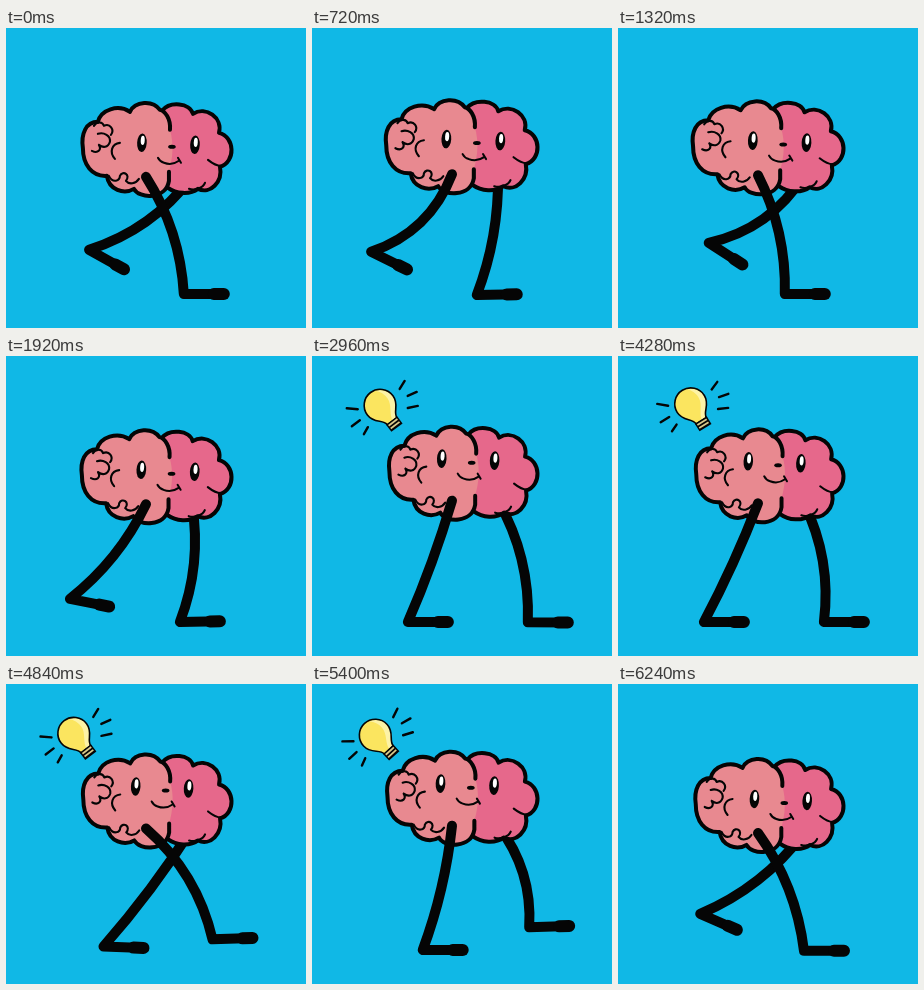
These frames come from a looping animation (300 px wide and 300 px high, 6.28 s). An HTML page with a canvas:

```html
<!DOCTYPE html>
<html lang="en">
<head>
<meta charset="utf-8">
<title>Walking brain</title>
<style>
html, body { margin: 0; width: 100%; height: 100%; overflow: hidden; background: #10b8e6; }
canvas { display: block; width: 100vw; height: 100vh; }
</style>
</head>
<body>
<canvas id="stage"></canvas>
<script>
const LOOP = 6280, STEPS = 5, SIZE = 300;
const INK = '#050505';
const canvas = document.getElementById('stage');
const ctx = canvas.getContext('2d');

// phase, heel x, heel y, foot angle in degrees, bend of the leg
const nearKeys = [
  [0, 178, 266, 0, 8], [.15, 146, 266, 0, 7], [.299, 111, 266, 0, 4],
  [.357, 96, 266, 0, 2], [.408, 86, 266, 0, 2], [.46, 75, 262, 3, 3],
  [.529, 64, 243, 11, 7], [.573, 59, 224, 26, 13], [.66, 78, 213, 32, 14],
  [.76, 142, 226, 18, 14], [.83, 198, 243, -2, 12], [.88, 207, 266, 0, 9]
];
const farKeys = [
  [0, 83, 222, 29, 10], [.08, 100, 214, 32, 13], [.18, 160, 226, 16, 14],
  [.25, 203, 238, 3, 12], [.299, 217, 243, -2, 10], [.34, 218, 264, 0, 9],
  [.408, 206, 266, 0, 9], [.529, 174, 266, -1, 8], [.573, 165, 267, -1, 6],
  [.7, 135, 266, 0, 5], [.87, 94, 261, 3, 3], [.93, 85, 242, 15, 7]
];

const leftLobe = 'M164 102C165 91 159 83 154 82C147 72 129 73 124 84' +
  'C112 76 95 82 92 94C80 94 75 106 77 120C77 137 86 149 101 148' +
  'C103 162 118 167 128 161C133 171 160 172 163 153L163 144';
const leftFill = new Path2D(leftLobe + 'C167 130 168 116 164 102Z');
const leftLine = new Path2D(leftLobe);
const rightLobe = 'M156 83C164 73 184 75 187 86C200 78 217 90 213 105' +
  'C229 109 230 134 214 139C217 154 204 167 192 161C184 167 170 166 162 160';
const rightFill = new Path2D(rightLobe + 'L150 150L150 90Z');
const rightLine = new Path2D(rightLobe);
const folds = new Path2D(
  'M88 98C91 93 97 94 98 98C104 95 109 102 105 107' +
  'M86 123C92 126 96 122 93 117M92 106C98 104 105 108 104 114C102 120 97 120 93 117' +
  'M114 115C106 116 103 124 109 131' +
  'M103 148C107 156 114 153 114 148C117 142 125 147 120 153C123 157 130 156 133 151' +
  'M202 132C207 136 211 138 215 138M183 161C189 163 197 160 199 155');
const mouth = new Path2D('M152 130Q154 134 158 135Q166 138 173 133M172 130L175 135');
const glass = new Path2D('M-6 19C-6 12 -16 10 -16 -1A16 16 0 0 1 16 -1C16 10 6 12 6 19Z');
const shine = new Path2D('M5 -15A16 16 0 0 1 16 -1C16 10 6 12 6 19L1 19C1 12 10 6 10 -2Q10 -10 5 -15Z');
const rays = new Path2D('M93 25L88 33M105 36L96 40M106 50L96 52' +
  'M35 52L46 53M40 70L48 64M52 78L56 71');

const clamp = v => Math.min(1, Math.max(0, v));
const span = (t, a, b) => clamp((t - a) / (b - a));
const smooth = v => v * v * (3 - 2 * v);
const backIn = v => 2.7 * v ** 3 - 1.7 * v * v;
const backOut = v => 1 - backIn(1 - v);

// Periodic cubic interpolation through unevenly spaced keys
function pose(keys, p) {
  const n = keys.length;
  const at = i => {
    const k = keys[(i + n) % n];
    return [k[0] + Math.floor(i / n), ...k.slice(1)];
  };
  let i = n - 1;
  while (keys[i][0] > p) i--;
  const [a, b, c, d] = [at(i - 1), at(i), at(i + 1), at(i + 2)];
  const h = c[0] - b[0], u = (p - b[0]) / h;
  return [1, 2, 3, 4].map(j => {
    const m0 = (c[j] - a[j]) / (c[0] - a[0]) * h;
    const m1 = (d[j] - b[j]) / (d[0] - b[0]) * h;
    const u2 = u * u, u3 = u2 * u;
    return (2 * u3 - 3 * u2 + 1) * b[j] + (u3 - 2 * u2 + u) * m0 +
      (3 * u2 - 2 * u3) * c[j] + (u3 - u2) * m1;
  });
}

function stroke(path, width) {
  ctx.strokeStyle = INK;
  ctx.lineWidth = width;
  ctx.stroke(path);
}

function fill(path, color) {
  ctx.fillStyle = color;
  ctx.fill(path);
}

function oval(x, y, rx, ry, color, turn = 0) {
  ctx.beginPath();
  ctx.ellipse(x, y, rx, ry, turn, 0, 7);
  ctx.fillStyle = color;
  ctx.fill();
}

function leg(hipX, hipY, keys, p) {
  const [x, y, deg, bend] = pose(keys, p);
  const dx = x - hipX, dy = y - hipY, len = Math.hypot(dx, dy);
  const kx = (hipX + x) / 2 + dy / len * bend * 2;
  const ky = (hipY + y) / 2 - dx / len * bend * 2;
  const a = deg * Math.PI / 180;
  const path = new Path2D();
  path.moveTo(hipX, hipY);
  path.quadraticCurveTo(kx, ky, x, y);
  path.lineTo(x + 40 * Math.cos(a), y + 40 * Math.sin(a));
  stroke(path, 10);
  const foot = new Path2D();
  foot.moveTo(x + 30 * Math.cos(a), y + 30 * Math.sin(a));
  foot.lineTo(x + 40 * Math.cos(a), y + 40 * Math.sin(a));
  stroke(foot, 12);
}

function eye(x, y) {
  oval(x, y, 4.8, 9.3, INK, .06);
  oval(x + .8, y - 2.5, 2, 4.6, '#fff', .06);
}

function face(dx, dy) {
  ctx.save();
  ctx.translate(dx, dy);
  eye(136, 115);
  eye(189, 117);
  oval(166, 119, 3.8, 2, INK);
  stroke(mouth, 2);
  ctx.restore();
}

function bulb(scale, turn) {
  if (scale <= 0) return;
  ctx.save();
  ctx.translate(86, 100);
  ctx.rotate(turn);
  ctx.translate(-6, -30);
  ctx.scale(scale, scale);
  ctx.translate(-80, -70);
  stroke(rays, 2.4);
  ctx.translate(69, 50);
  ctx.rotate(-.64);
  fill(glass, '#fbe55f');
  fill(shine, '#fdf3a6');
  stroke(glass, 1.6);
  ctx.fillStyle = INK;
  ctx.fillRect(-7, 18, 14, 9);
  ctx.fillStyle = '#d9c98a';
  for (const y of [19.5, 23]) ctx.fillRect(-5.5, y, 11, 1.8);
  ctx.restore();
}

function draw(t) {
  const p = t / LOOP * STEPS % 1;
  const beat = shift => 4 * Math.PI * (p + shift);
  const bob = -4.5 + 4.5 * Math.cos(beat(.02));
  const left = 74.3 + 3 * Math.cos(beat(-.42));
  const stretch = (226 - left) / 150;
  const look = smooth(span(t, 1980, 2340)) - smooth(span(t, 5480, 5800));
  const size = t < 4000 ? backOut(span(t, 1960, 2360)) : 1 - backIn(span(t, 5560, 5840));

  const zoomX = canvas.width / SIZE, zoomY = canvas.height / SIZE;
  ctx.setTransform(zoomX, 0, 0, zoomY, 0, 0);
  ctx.fillStyle = '#10b8e6';
  ctx.fillRect(0, 0, SIZE, SIZE);
  ctx.lineCap = 'round';
  ctx.lineJoin = 'round';

  leg(186, 149 + bob, farKeys, p);
  ctx.save();
  ctx.translate(226, bob);
  ctx.scale(stretch, 1);
  ctx.translate(-226, 0);
  fill(rightFill, '#e6688b');
  stroke(rightLine, 4);
  fill(leftFill, '#e88990');
  stroke(leftLine, 4);
  stroke(folds, 2.1);
  face(-6.5 * look, -8 * look + bob * .4 * (1 - look));
  ctx.restore();
  leg(140, 149 + bob, nearKeys, p);
  bulb(size, .148 * Math.sin(beat(-.36)));
}

function resize() {
  const ratio = window.devicePixelRatio || 1;
  canvas.width = Math.round(innerWidth * ratio);
  canvas.height = Math.round(innerHeight * ratio);
}

const start = performance.now();
function tick() {
  draw((performance.now() - start) % LOOP);
  requestAnimationFrame(tick);
}
addEventListener('resize', resize);
resize();
tick();
</script>
</body>
</html>
```
